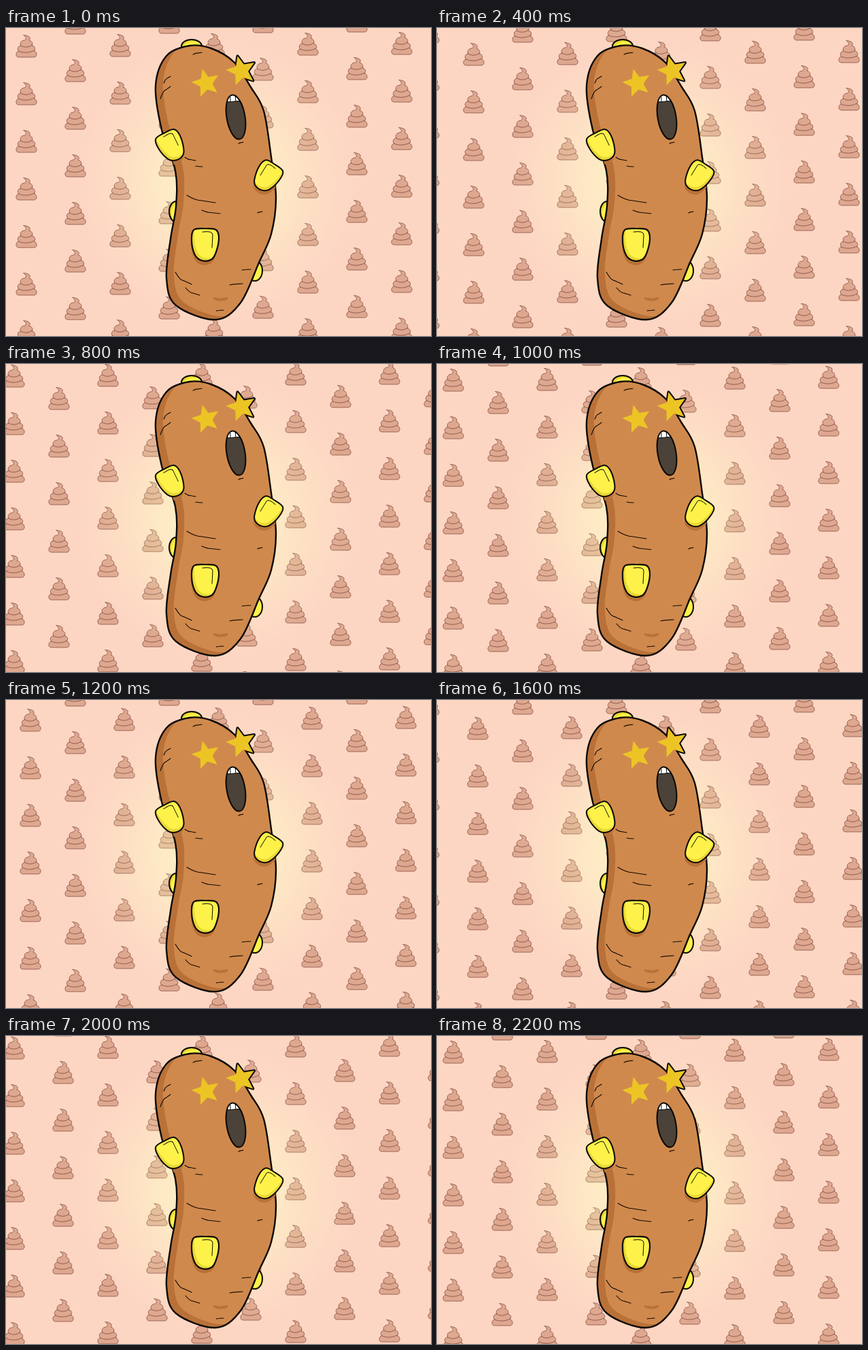
Recreate the animation shown at these times as an HTML page with a canvas. Size 625x453 px, loop 2.3 s.

```html
<!DOCTYPE html>
<html>
<head>
<meta charset="utf-8">
<style>
html, body { margin: 0; width: 100%; height: 100%; overflow: hidden; background: #fdd6c3; }
canvas { display: block; }
</style>
</head>
<body>
<canvas width="625" height="453"></canvas>
<script>
const W = 625, H = 453;
const ctx = document.querySelector('canvas').getContext('2d');
const INK = '#0c0805', BROWN = '#d0894d', SHADE = '#b97138';
const YELLOW = '#fef24a', OCHRE = '#e9d835', GOLD = '#ecc525';

// Closed smooth curve through "x,y" key points.
function blob(text) {
  const pts = text.split(' ').map(p => p.split(',').map(Number));
  const at = i => pts[(i + pts.length) % pts.length];
  const path = new Path2D();
  path.moveTo(...pts[0]);
  pts.forEach((p, i) => {
    const before = at(i - 1), q = at(i + 1), after = at(i + 2);
    path.bezierCurveTo(
      p[0] + (q[0] - before[0]) / 6, p[1] + (q[1] - before[1]) / 6,
      q[0] - (after[0] - p[0]) / 6, q[1] - (after[1] - p[1]) / 6, q[0], q[1]);
  });
  return path;
}

function ellipse(x, y, rx, ry, tilt = 0) {
  const path = new Path2D();
  path.ellipse(x, y, rx, ry, tilt, 0, 2 * Math.PI);
  return path;
}

function star(x, y, r) {
  const path = new Path2D();
  for (let i = 0; i < 10; i++) {
    const a = -1.82 + i * Math.PI / 5, d = i % 2 ? r * .45 : r;
    path.lineTo(x + d * Math.cos(a), y + d * Math.sin(a));
  }
  path.closePath();
  return path;
}

// Runs draw with the origin moved, turned and scaled.
function placed(x, y, draw, turn = 0, sx = 1, sy = sx) {
  ctx.save();
  ctx.translate(x, y);
  ctx.rotate(turn);
  ctx.scale(sx, sy);
  draw();
  ctx.restore();
}

function clipped(path, draw) {
  ctx.save();
  ctx.clip(path);
  draw();
  ctx.restore();
}

function fill(path, color) {
  ctx.fillStyle = color;
  ctx.fill(path);
}

function stroke(path, width, color = INK) {
  ctx.strokeStyle = color;
  ctx.lineWidth = width;
  ctx.stroke(path);
}

// Fills with a shade, then lights all but the edge left by the offset.
function shaded(path, dark, light, dx, dy, width) {
  fill(path, dark);
  clipped(path, () => placed(dx, dy, () => fill(path, light)));
  stroke(path, width);
}

const swirl = new Path2D('M-4,-16.5C5,-16 7,-12 4,-9C9,-8 10,-3 8,-1C13,-1 14,5 11,7C16,7 17,16 11,16H-11C-17,16 -16,7 -11,7C-14,5 -13,-1 -8,-1C-10,-3 -9,-8 -4,-9C0,-9 1,-13 -4,-16.5Z');
const folds = new Path2D('M-8,-1C-4,2 4,2 8,-2M-11,7C-6,10 5,10 11,6');

const body = blob('270,26 302,30 335,50 360,87 379,122 390,190 397,250 390,303 372,345 345,404 308,429 250,408 236,368 242,310 250,262 249,210 229,150 220,85 236,41');
const rear = [ellipse(273, 27, 15, 10), ellipse(250, 270, 10, 15), ellipse(366, 357, 11, 15)];
const nub = blob('-20,-4 -17,-21 0,-23 16,-21 20,-8 15,14 8,23 -5,24 -15,16');
const crease = new Path2D('M-4,-18Q11,-20 11,-14L10,5');
const nubs = [
  { x: 243, y: 173, turn: -.5, sx: .92, sy: .92 },
  { x: 384, y: 218, turn: .6, sx: -.9, sy: .9 },
  { x: 293, y: 318, turn: 0, sx: 1, sy: 1 }
];
const mouth = ellipse(338, 131, 13.5, 33, -.17);
const teeth = new Path2D('M318,90H348V107L322,109ZM329,90L330,108M336,90L338,108');
const leftEye = star(294, 81, 21.5), rightEye = star(346, 63, 22.5);

// Each crack starts at x, y and runs by dx, dy.
const wrinkles = new Path2D();
for (const [x, y, dx, dy] of [
  [275, 39, 13, -3], [232, 81, 10, -10], [227, 104, 15, -18], [263, 190, 16, 5],
  [279, 203, 10, 1], [266, 246, 42, 11], [288, 268, 27, 5], [370, 272, 7, -2],
  [347, 356, 13, -1], [329, 378, 19, -2], [249, 359, 24, 18], [264, 382, 21, 11],
  [309, 416, 11, -1], [342, 170, 7, -2]
]) {
  wrinkles.moveTo(x, y);
  wrinkles.quadraticCurveTo(x + dx * .3, y + dy * .7, x + dx * .5, y + dy * .7);
  wrinkles.lineTo(x + dx, y + dy);
}

const glow = ctx.createRadialGradient(312, 226, 0, 312, 226, 205);
glow.addColorStop(0, 'rgba(255,250,200,.92)');
glow.addColorStop(.4, 'rgba(255,247,198,.55)');
glow.addColorStop(1, 'rgba(255,232,200,0)');

function drawGlow(alpha) {
  ctx.globalAlpha = alpha;
  ctx.fillStyle = glow;
  ctx.fillRect(0, 0, W, H);
  ctx.globalAlpha = 1;
}

function drawSwirl() {
  fill(swirl, '#e0c7bb');
  stroke(swirl, 1, '#aa8c87');
  stroke(folds, 1, '#aa8c87');
}

function drawBackground(step) {
  ctx.fillStyle = '#fdd6c3';
  ctx.fillRect(0, 0, W, H);
  drawGlow(.9);
  ctx.globalCompositeOperation = 'multiply';
  for (let col = -2; col < 6; col++)
    for (let row = -2; row < 8; row++)
      for (const odd of [0, 1])
        placed(30 + col * 138 + odd * 72 + step * 6, 27 + row * 70 - col + odd * 36 + step * 3, drawSwirl);
  ctx.globalCompositeOperation = 'source-over';
  drawGlow(.4);
}

function drawPotato() {
  for (const path of rear) shaded(path, OCHRE, YELLOW, 3, 3, 2);
  stroke(rightEye, 4);
  shaded(body, SHADE, BROWN, 11, -5, 2.4);
  stroke(new Path2D('M307,398Q315,401 324,398'), 4, SHADE);
  stroke(wrinkles, 1.1);

  for (const { x, y, turn, sx, sy } of nubs) {
    clipped(body, () => placed(x - 1, y + 6, () => fill(nub, SHADE), turn, sx, sy));
    placed(x, y, () => {
      shaded(nub, OCHRE, YELLOW, 4, -4, 2.2);
      stroke(crease, 1);
    }, turn, sx, sy);
  }

  fill(mouth, '#4b4239');
  clipped(mouth, () => {
    fill(teeth, '#fff');
    stroke(teeth, 1);
  });
  stroke(mouth, 2);
  fill(leftEye, GOLD);
  fill(rightEye, GOLD);
}

ctx.lineJoin = ctx.lineCap = 'round';
function frame() {
  drawBackground(Math.floor(performance.now() % 2300 / 100));
  drawPotato();
  requestAnimationFrame(frame);
}
frame();
</script>
</body>
</html>
```
